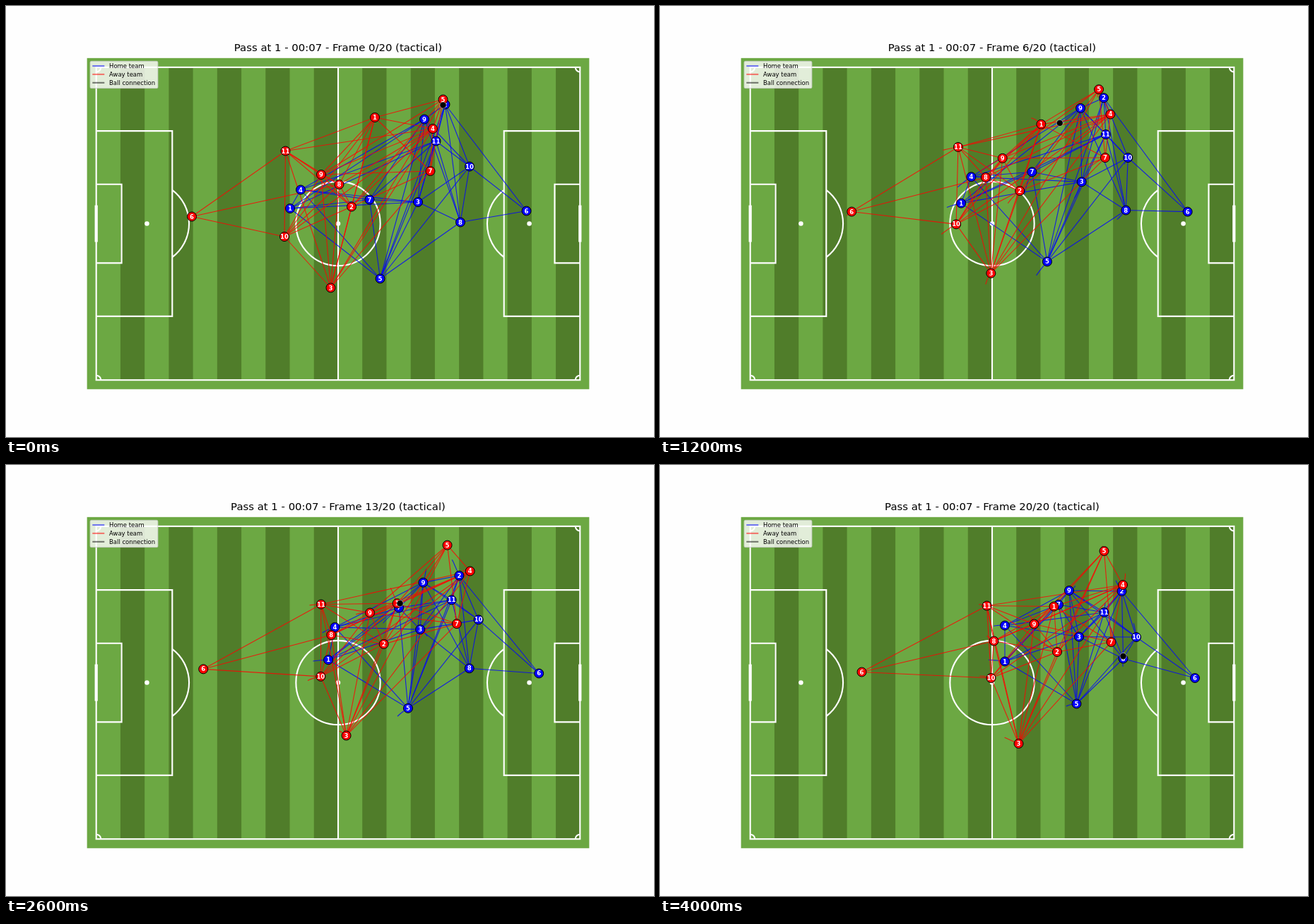
An HTML page that plays this animation: 917 px wide and 611 px high, repeating every 4.2 s.

```html
<!DOCTYPE html>
<html lang="en">
<head>
<meta charset="utf-8">
<title>Pass map</title>
<style>
  html, body { margin: 0; width: 100%; height: 100%; overflow: hidden; background: #fefefe; }
  svg { display: block; width: 100vw; height: 100vh; font-family: "DejaVu Sans", sans-serif; }
  .num { font-weight: bold; font-size: 8.49px; fill: #fff; text-anchor: middle; }
</style>
</head>
<body>
<svg viewBox="0 0 917 611">
  <!-- The pitch is drawn in metres around its centre. -->
  <g transform="translate(470 308.55) scale(6.52)" fill="none" stroke="#fff" stroke-width=".325">
    <rect x="-54.5" y="-36" width="109" height="72" fill="#6ca843" stroke="none"/>
    <g id="stripes" fill="#507d2a" stroke="none"></g>
    <rect x="-52.5" y="-34" width="105" height="68"/>
    <path d="M0 -34V34"/>
    <circle r="9.15"/>
    <circle r=".5" fill="#fff" stroke="none"/>
    <g id="half">
      <path d="M-52.5 -20.15H-36V20.15H-52.5M-52.5 -8.56H-47V8.56H-52.5M-36 -7.31A9.15 9.15 0 0 1 -36 7.31"/>
      <path d="M-51.5 -34A1 1 0 0 1 -52.5 -33M-52.5 33A1 1 0 0 1 -51.5 34"/>
      <path d="M-52.5 -3.66V3.66" stroke-width=".65" stroke-linecap="square"/>
      <circle cx="-41.5" r=".5" fill="#fff" stroke="none"/>
    </g>
    <use href="#half" transform="scale(-1 1)"/>
  </g>
  <g id="play"></g>
  <rect x="119.1" y="78.3" width="95.8" height="38.3" rx="1.7" fill="#fff" fill-opacity=".8" stroke="#ccc" stroke-opacity=".8"/>
  <g id="legend" font-size="8.49"></g>
  <text id="title" x="470" y="63.5" font-size="14.86" text-anchor="middle"></text>
</svg>
<script>
const $ = id => document.getElementById(id);
const STEP = 200, LAST = 20, TRAIL = 5;

// A run is a smooth curve through a few points, evenly spaced in time.
function run(...pts) {
  const n = pts.length;
  const beyond = (a, b, c) => a.map((v, k) => 3 * v - 3 * b[k] + c[k]);
  const p = [beyond(...pts), ...pts, beyond(...pts.slice().reverse())];
  return t => {
    const s = t / LAST * (n - 1), i = Math.min(Math.floor(s), n - 2), u = s - i;
    return [0, 1].map(k => {
      const [a, b, c, d] = p.slice(i, i + 4).map(q => q[k]);
      return b + u / 2 * (c - a + u * (2 * a - 5 * b + 4 * c - d + u * (3 * (b - c) + d - a)));
    });
  };
}

// Runs are keyed by shirt number; lines go keeper, defence, midfield, attack.
const home = {
  color: '#00f',
  lines: [[6], [2, 8, 10], [3, 5, 9, 11], [1, 4, 7]],
  runs: {
    1: run([402, 287], [443, 277], [488, 278.5]),
    2: run([621.5, 139.5], [629, 131], [642, 158], [653.5, 179]),
    3: run([583, 278], [597, 247], [586, 233], [593, 243.5]),
    4: run([417, 260.5], [455, 234], [488, 227.5]),
    5: run([529.5, 386.5], [560, 351], [589.5, 338.5]),
    6: run([736.5, 290.5], [751.5, 293.5], [757, 302]),
    7: run([514.5, 274.5], [528.5, 231.5], [557, 201.5], [564, 198]),
    8: run([643, 306.5], [660, 288.5], [655.5, 288], [655.5, 274.5]),
    9: run([592, 160.5], [595, 145], [590, 167.5], [579, 178]),
    10: run([656, 227.5], [666, 215], [674, 244]),
    11: run([608.5, 191.5], [632, 182], [630.5, 192], [628.5, 209])
  }
};
const away = {
  color: '#f00',
  lines: [[6], [8, 10, 11], [1, 2, 3, 4, 9], [5, 7]],
  runs: {
    1: run([522, 158], [541, 169.5], [554, 197], [557.5, 200.5]),
    2: run([489, 284.5], [523.5, 255], [562, 265]),
    3: run([459.5, 399.5], [469.5, 378], [482.5, 384], [507.5, 395]),
    4: run([604, 174], [651, 149], [655, 170]),
    5: run([618.5, 132.5], [623, 114], [628.5, 122]),
    6: run([263, 298.5], [276, 289.5], [285.5, 293.5]),
    7: run([600.5, 234], [632, 214.5], [638, 226], [638.5, 251]),
    8: run([471.5, 253], [459, 240.5], [472.5, 249.5]),
    9: run([446, 239], [504, 209.5], [529.5, 225.5]),
    10: run([394, 327], [434.5, 302.5], [468.5, 302]),
    11: run([395.5, 205.5], [436.5, 198], [462.5, 199.5])
  }
};

// The ball is passed to away 1, carried along, then passed on.
const mix = (a, b, u) => a.map((v, k) => v + (b[k] - v) * u);
function ball(t) {
  const got = 8, left = 13;
  const [x, y] = away.runs[1](Math.min(Math.max(t, got), left)), foot = [x + 4, y];
  return t < got ? mix([618.5, 140.5], foot, t / got)
    : t > left ? mix(foot, [655.5, 271], (t - left) / (LAST - left)) : foot;
}

// Team-mates are linked within a line and with the next line.
for (const team of [home, away]) {
  team.links = team.lines.flatMap((line, i) => line.flatMap((a, j) =>
    [...line.slice(j + 1), ...(team.lines[i + 1] || [])].map(b => [a, b])));
}

const polyline = pts => `<path d="M${pts.join('L')}"/>`;

function strokes({ color, links, runs }, t) {
  const from = Math.max(1, t - TRAIL);
  const times = Array.from({ length: Math.max(0, t - from + 1) }, (_, k) => from + k);
  const trails = times.length ? Object.values(runs).map(r => polyline(times.map(r))) : [];
  const passes = links.map(([a, b]) => polyline([runs[a](t), runs[b](t)]));
  return `<g fill="none" stroke="${color}" stroke-width="1.1" stroke-opacity=".82">${passes.join('')}${trails.join('')}</g>`;
}

const players = ({ color, runs }, t) => Object.entries(runs).map(([n, r]) => {
  const [x, y] = r(t);
  return `<circle cx="${x}" cy="${y}" r="6.5" fill="${color}" stroke="#000"/>` +
    `<text class="num" x="${x}" y="${y + 3}">${n}</text>`;
}).join('');

function draw(t) {
  const [x, y] = ball(t);
  $('play').innerHTML = strokes(home, t) + strokes(away, t) + players(home, t) + players(away, t) +
    `<circle cx="${x}" cy="${y}" r="4.6" stroke="#fff" stroke-width=".5"/>`;
  $('title').textContent = `Pass at 1 - 00:07 - Frame ${t}/${LAST} (tactical)`;
}

for (let x = -47.25; x < 52; x += 10.5)
  $('stripes').innerHTML += `<rect x="${x}" y="-34" width="5.25" height="68"/>`;

[['Home team', home.color], ['Away team', away.color], ['Ball connection', '#000']].forEach(([label, color], i) => {
  const y = 85 + i * 11.9;
  $('legend').innerHTML += `<path d="M122.3 ${y}h17" stroke="${color}" stroke-width="2.12" stroke-opacity=".5"/>` +
    `<text x="146" y="${y + 3}">${label}</text>`;
});

let shown = -1;
function tick() {
  const t = Math.floor(performance.now() / STEP) % (LAST + 1);
  if (t !== shown) draw(shown = t);
  requestAnimationFrame(tick);
}
tick();
</script>
</body>
</html>
```
